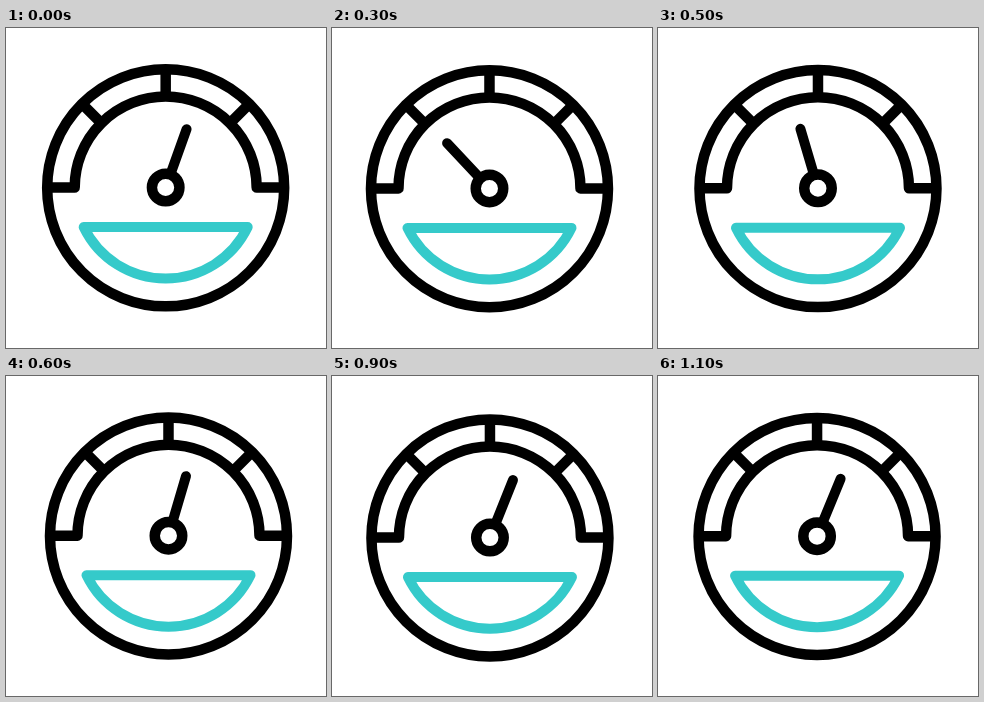
An HTML page that plays this animation: 320x320 px, repeating every 1.2 s.

```html
<!DOCTYPE html>
<html lang="en">
<head>
<meta charset="utf-8">
<title>Gauge</title>
<style>
  html, body { margin: 0; width: 100%; height: 100%; overflow: hidden; background: #fff; }
  svg { display: block; width: 100%; height: 100%; }
</style>
</head>
<body>
<svg viewBox="0 0 320 320">
  <g id="gauge" fill="none" stroke="#000" stroke-width="10.5" stroke-linejoin="round">
    <circle cy="0.3" r="118.5"/>
    <path d="M-118 0H-91A91 91 0 0 1 91 0H118"/>
    <path d="M0 -118V-91M-83 -83L-64 -64M83 -83L64 -64"/>
    <path d="M-82 39.5H82A91 91 0 0 1 -82 39.5Z" stroke="#35caca" stroke-width="10"/>
    <path id="needle" d="M0 -14V-62" stroke-width="10" stroke-linecap="round"/>
    <circle r="13.75"/>
  </g>
</svg>
<script>
  const LOOP = 1200, STEP = 100;
  const FALL_END = 370, RISE_END = 655;
  const START = 19.7, LOW = -46, REST = 22.5;
  const { PI, sin, cos, exp, floor } = Math;
  const gauge = document.getElementById('gauge');
  const needle = document.getElementById('needle');

  const mix = (from, to, amount) => from + (to - from) * amount;
  const easeOut = p => sin(p * PI / 2);
  const easeInOut = p => (1 - cos(p * PI)) / 2;

  // Needle drops to the left, swings back and settles with a small wobble.
  function needleAngle(t) {
    if (t < FALL_END) return mix(START, LOW, easeOut(t / FALL_END));
    if (t < RISE_END) return mix(LOW, REST, easeInOut((t - FALL_END) / (RISE_END - FALL_END)));
    const since = t - 800;
    return REST + 1.4 * exp(-since / 150) * cos(since * PI / 100);
  }

  // The whole dial trembles: three waves on each axis.
  function dialCentre(t) {
    const a = 2 * PI * t / LOOP;
    return [
      159.4 + 1.8 * cos(a + 2.69) + 1.88 * cos(2 * a - 0.46) + 0.59 * cos(3 * a + 1.2),
      160.3 + 0.76 * cos(a + 2.21) + 0.78 * cos(2 * a + 2.72) + 0.4 * cos(3 * a)
    ];
  }

  function draw(time) {
    const t = floor(time % LOOP / STEP) * STEP;
    gauge.setAttribute('transform', `translate(${dialCentre(t)})`);
    needle.setAttribute('transform', `rotate(${needleAngle(t)})`);
  }

  let start;
  function tick(now) {
    start ??= now;
    draw(now - start);
    requestAnimationFrame(tick);
  }
  draw(0);
  requestAnimationFrame(tick);
</script>
</body>
</html>
```
